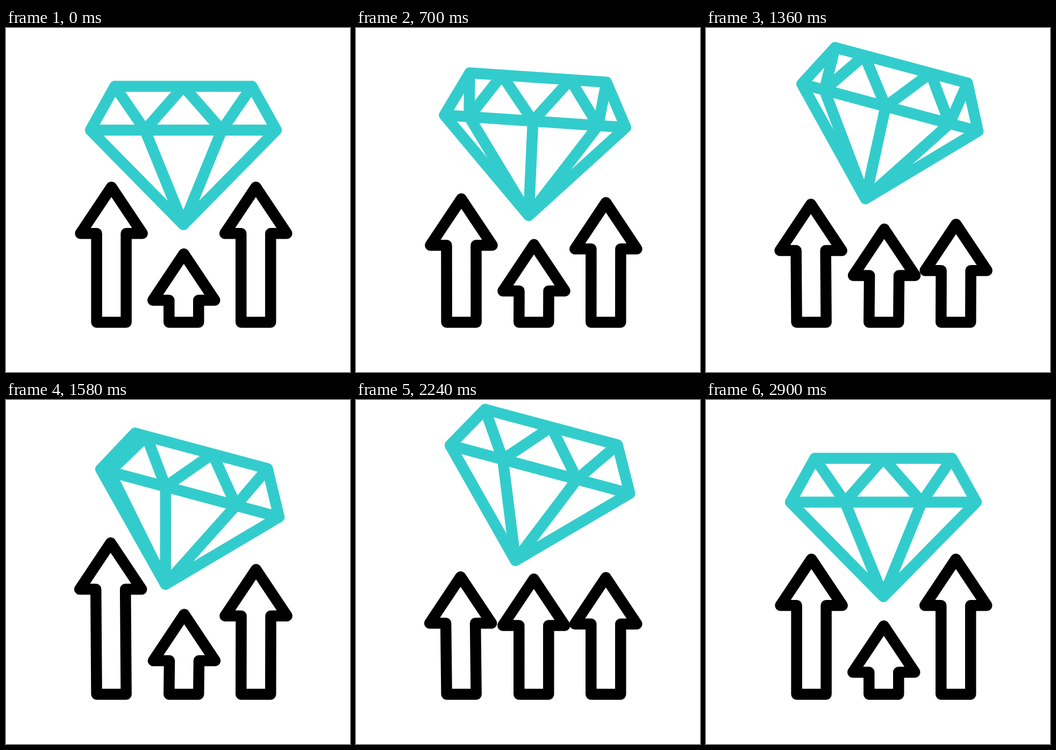
Recreate the animation shown at these times as an HTML page with a canvas. Size 640 by 640 pixels, loop 3120 ms.

```html
<!DOCTYPE html>
<html lang="en">
<head>
<meta charset="utf-8">
<title>Rising diamond</title>
<style>
  html, body { margin: 0; width: 100%; height: 100%; overflow: hidden; background: #fff; }
  canvas { display: block; width: 640px; height: 640px; }
</style>
</head>
<body>
<canvas id="stage" width="640" height="640"></canvas>
<script>
const ctx = document.getElementById('stage').getContext('2d');
const LOOP = 3120, STEP = 20;

// Key times: rest, first pose, middle pose, last pose, rest.
const DIAMOND_TIMES = [500, 1100, 1700, 2300, 2900];
const ARROW_TIMES = [500, 1100, 1680, 2300, 2900];
const LIFT = [0, -64, -13, -64, 0];
const TILT = [0, 15, 15, 15, 0];

const ARROWS = [
  { x: 196.1, apex: 296, rise: [0, 84.4, -40, 35, 0], drift: [0, -0.6, -1.5, -1.5, 0] },
  { x: 330.8, apex: 420.2, rise: [0, -67, -17.5, -89, 0], drift: [0, 0.9, 0.7, 0, 0] },
  { x: 464.8, apex: 296, rise: [0, 111, 11.5, 35, 0], drift: [0, 0.4, 0.3, 0, 0] }
];

const clamp = (v, lo, hi) => Math.min(hi, Math.max(lo, v));
const mix = (a, b, u) => a + (b - a) * u;
const smooth = u => u * u * (3 - 2 * u);

function keyed(times, values, t) {
  let i = 0;
  while (i < times.length - 2 && t > times[i + 1]) i++;
  const u = clamp((t - times[i]) / (times[i + 1] - times[i]), 0, 1);
  return mix(values[i], values[i + 1], smooth(u));
}

// Linear interpolation through evenly spaced stops, clamped at both ends.
function along(stops, s) {
  s = clamp(s, 0, stops.length - 1);
  const i = Math.min(Math.floor(s), stops.length - 2);
  return mix(stops[i], stops[i + 1], s - i);
}

function trace(points, closed) {
  points.forEach(([x, y], i) => i ? ctx.lineTo(x, y) : ctx.moveTo(x, y));
  if (closed) ctx.closePath();
}

function drawArrow({ x, apex, rise, drift }, t) {
  const top = apex + keyed(ARROW_TIMES, rise, t);
  const cx = x + keyed(ARROW_TIMES, drift, t);
  const wing = 57.6, shaft = 27.5, neck = top + 86.3, base = 547.5;
  ctx.strokeStyle = '#000';
  ctx.beginPath();
  trace([
    [cx, top], [cx + wing, neck], [cx + shaft, neck], [x + shaft, base],
    [x - shaft, base], [cx - shaft, neck], [cx - wing, neck]
  ], true);
  ctx.stroke();
}

function drawDiamond(t) {
  const u = clamp((t - 200) / 1600, 0, 1);
  const spin = 2 * mix(u, smooth(u), 0.6);
  const wide = 173 - 7.5 * (1 - Math.abs(spin - 1));
  const crown = 127.5, topY = -128.5, girdleY = -47, tip = [0, 128.7];
  const girdle = [-wide, -71.5, 71.5, wide];
  const table = [-crown, 0, crown];

  ctx.save();
  ctx.translate(330, 237 + keyed(DIAMOND_TIMES, LIFT, t));
  ctx.rotate(keyed(DIAMOND_TIMES, TILT, t) * Math.PI / 180);
  ctx.strokeStyle = '#33cccc';
  ctx.beginPath();
  trace([[-crown, topY], [crown, topY], [wide, girdleY], tip, [-wide, girdleY]], true);
  trace([[-wide, girdleY], [wide, girdleY]]);

  // Facet corners slide from right to left and vanish at the rim.
  for (let k = 1; k <= 5; k++) {
    const s = k - spin;
    if (s <= 0 || s >= 3) continue;
    const corner = [along(girdle, s), girdleY];
    trace([[along(table, s - 1), topY], corner, [along(table, s), topY]]);
    trace([corner, tip]);
  }
  ctx.stroke();
  ctx.restore();
}

function draw(now) {
  const t = Math.floor((now % LOOP) / STEP) * STEP;
  ctx.fillStyle = '#fff';
  ctx.fillRect(0, 0, 640, 640);
  ctx.lineWidth = 20.5;
  ctx.lineJoin = ctx.lineCap = 'round';
  drawDiamond(t);
  ARROWS.forEach(arrow => drawArrow(arrow, t));
  requestAnimationFrame(draw);
}

draw(0);
</script>
</body>
</html>
```
